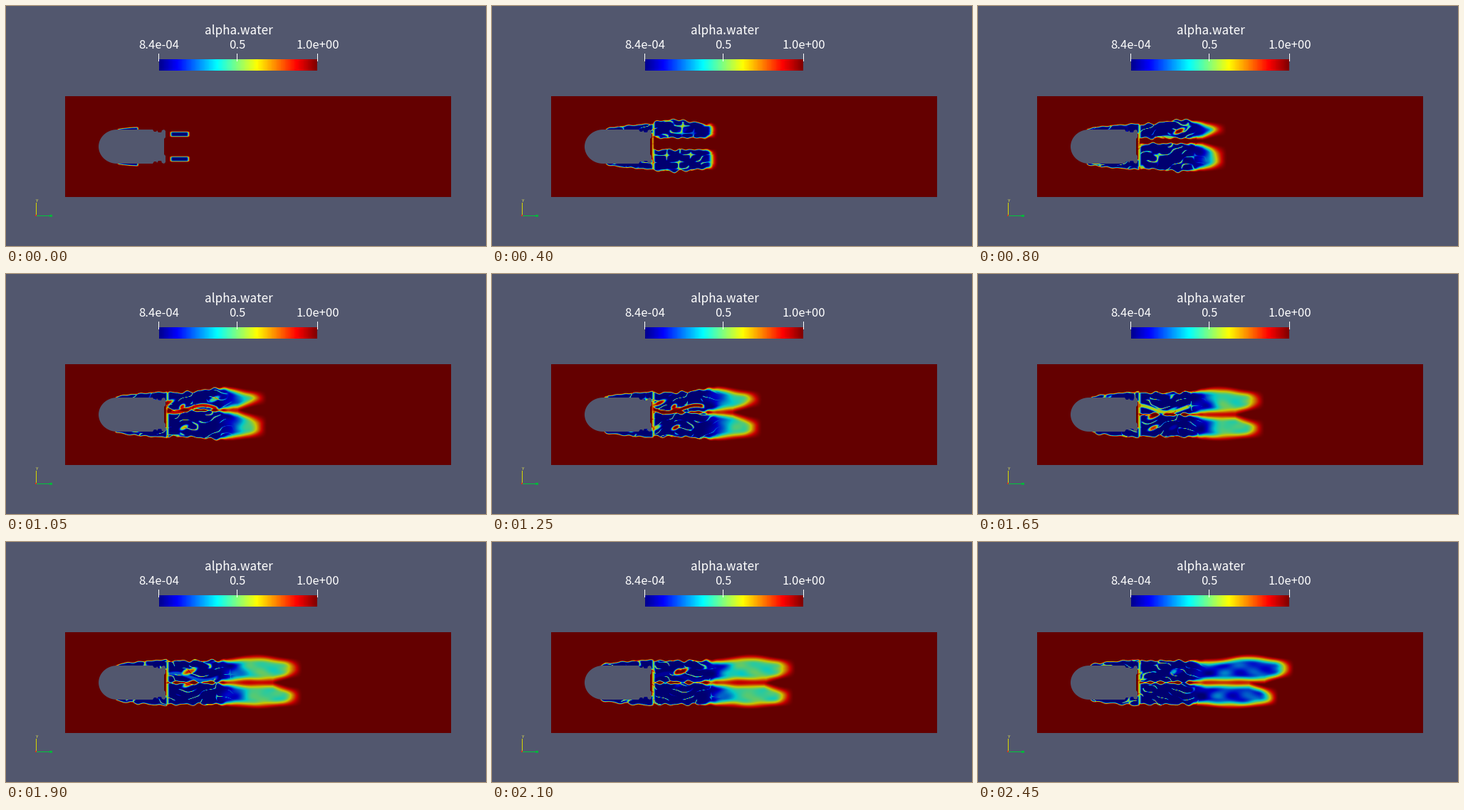
A matplotlib script that plays this animation: 674 by 338 pixels, repeating every 2500 ms.

```python
import numpy as np
import matplotlib.pyplot as plt
from matplotlib.animation import FuncAnimation
from matplotlib.colors import LinearSegmentedColormap
from matplotlib.patches import Polygon, Rectangle

W, H, DPI = 674, 338, 64
FRAMES, STEP = 50, 50
LAST = (FRAMES - 1) * STEP
PT = 72 / DPI
BG = "#52576e"
LEFT, RIGHT, TOP, BOTTOM = 83, 625, 127, 269
AXIS, BODY_R, STERN = 198, 24, 222
LIT = .79  # the tank surface is shaded darker than the legend

STOPS = [(0, (0, 0, .56)), (.111, (0, 0, 1)), (.365, (0, 1, 1)), (.492, (.5, 1, .5)),
         (.619, (1, 1, 0)), (.873, (1, 0, 0)), (1, (.5, 0, 0))]


def jet(shade):
    stops = [(p, tuple(shade * c for c in rgb)) for p, rgb in STOPS]
    return LinearSegmentedColormap.from_list("jet", stops, 256)


# Only this part of the tank ever holds vapour.
X0, X1 = 140, 460
X, Y = np.meshgrid(np.arange(X0, X1) + .5, np.arange(TOP, BOTTOM) + .5)
R = abs(Y - AXIS)


def smooth(v):
    v = np.clip(v, 0, 1)
    return v * v * (3 - 2 * v)


# The mesh is coarser downstream, so edges blur there.
COARSE = smooth((X - 290) / 35)
EDGE = 2.8 + 11.5 * COARSE

rng = np.random.default_rng(7)


def make_waves(count, long_x, long_y):
    kx = 2 * np.pi / rng.uniform(*long_x, count) * rng.choice([-1, 1], count)
    ky = 2 * np.pi / rng.uniform(*long_y, count)
    return list(zip(kx, ky, rng.uniform(0, 2 * np.pi, count), rng.uniform(-2, 2, count)))


FINE = make_waves(6, (22, 60), (13, 34))
BROAD = make_waves(5, (28, 60), (20, 50))
ROUGH = make_waves(5, (12, 32), (30, 90))
# Water pockets: birth time, x, y, length, height
POCKETS = rng.uniform((500, 230, 176, 4, 2), (2300, 285, 222, 9, 4), (9, 5))


def noise(waves, t, speed=.06):
    x = X - speed * t
    total = sum(np.sin(kx * x + ky * Y + p + w * t / 1000) for kx, ky, p, w in waves)
    return total * np.sqrt(2 / len(waves))


def lobe(t, side, rough):
    """One half of the wake; side is -1 above the axis and 1 below."""
    s, grow = t / LAST, smooth(t / 350)
    front = 259 + 182 * s ** .65 - (22 * smooth((t - 2000) / 450) if side > 0 else 0)
    middle = AXIS - 8 * np.sin(np.pi * min(t, 1600) / 1600) ** 2

    bulge = np.exp(-((X - front + 60) / 34) ** 2)
    outer = 32 + (7 if side < 0 else 4) * bulge
    outer = 22 + (outer - 22) * grow + 2.5 * COARSE
    split = -9 + 17 * smooth((X - front + 75) / 70)
    split = np.maximum(split, 7 * (1 - smooth((t - 500) / 500)))
    inner = 13 + (side * (middle - AXIS) + split - 13) * grow - 3 * COARSE

    across = side * (Y - AXIS)
    start = 229 - 4 * grow
    level = 1 - (.38 - .3 * smooth((t - 2100) / 350)) * smooth((X - 306 - 10 * s) / 32)
    return (smooth((outer - across + rough) / EDGE)
            * smooth((across - inner + rough) / EDGE)
            * smooth((X - start) / 5)
            * smooth((front + 4 * COARSE - X) / (2 * EDGE))
            * level)


def sheet(t, rough):
    """Thin vapour layer along both sides of the body."""
    grow = smooth(t / 350)
    start = 155 + 4 * np.sin(t / 190)
    end = 187 + 41 * grow
    u = np.clip((X - start) / (end - start), 0, 1)
    outer = BODY_R + .7 + (4 + 5 * grow) * np.sqrt(u)
    return smooth((outer - R + .5 * rough) / 3) * smooth((X - start) / 4) * smooth((end - X) / 4)


def meander(t):
    """Wavy water jet near the axis, strongest in mid loop."""
    strength = np.sin(np.pi * t / 2500) ** 4
    y = AXIS - 8 + 5 * np.sin((X - .05 * t) / 13)
    span = smooth((X - 224) / 4) * smooth((300 - X) / 6)
    return strength * span * np.exp(-((Y - y) / 2.8) ** 4)


def pocket(t, born, x, y, length, height):
    life = np.clip((t - born) / 400, -1, 1)
    dx, dy = X - x - 16 * life, Y - y
    dist = (dx / length) ** 2 + ((dy + .4 * dx) / height) ** 2
    return np.cos(life * np.pi / 2) * np.exp(-dist ** 2)


GAP = smooth((227 - X) / 3) * smooth((21 - R) / 4)


def water(t):
    rough = min(1, t / 300) * (1 - COARSE) * noise(ROUGH, t)
    broad = noise(BROAD, t)
    dry = (1 - lobe(t, -1, rough)) * (1 - lobe(t, 1, rough)) * (1 - sheet(t, rough))
    vapour = 1 - dry

    amount = .6 * min(1, t / 400)
    ridge = np.exp(-(noise(FINE, t) / .22) ** 2) * smooth(broad + .5)
    vapour *= 1 - amount * ridge * (1 - COARSE)
    vapour *= 1 - .1 * COARSE * (1 + broad / 2)
    vapour *= 1 - meander(t)
    for p in POCKETS:
        vapour *= 1 - pocket(t, *p)
    return 1 - vapour * (1 - GAP)


fig = plt.figure(figsize=(W / DPI, H / DPI), dpi=DPI, facecolor=BG)
ax = fig.add_axes([0, 0, 1, 1])
ax.axis("off")


def image(data, cmap, extent):
    return ax.imshow(data, cmap=cmap, vmin=0, vmax=1, aspect="auto",
                     interpolation="nearest", extent=extent)


def box(x, y, w, h, color):
    ax.add_patch(Rectangle((x, y), w, h, fc=color, ec="none", zorder=4))


def label(x, y, text, size=16.6, color="white"):
    ax.text(x, y, text, fontsize=size * PT, color=color, ha="center", va="baseline",
            family="Noto Sans CJK JP", weight="light", zorder=5)


field = np.ones((BOTTOM - TOP, RIGHT - LEFT))
tank = image(field, jet(LIT), (LEFT, RIGHT, BOTTOM, TOP))
image(np.linspace(0, 1, 222)[None], jet(1), (215, 437, 91, 75))
ax.set_xlim(0, W)
ax.set_ylim(H, 0)

# Body: round nose, straight sides, notched rear corners
angle = np.linspace(1.5 * np.pi, .5 * np.pi, 40)
nose = [(156 + 26 * np.cos(a), AXIS + BODY_R * np.sin(a)) for a in angle]
notch = [(206, 174), (208, 177), (211, 177), (212, 175), (214, 178),
         (218, 178), (219, 175), (STERN, 174), (224, 176), (224, 185), (STERN, 187)]
mirror = [(x, 2 * AXIS - y) for x, y in notch]
ax.add_patch(Polygon(nose + mirror + notch[::-1], fc=BG, ec="none", zorder=3))

label(327, 40, "alpha.water", 17)
for x, text in [(214, "8.4e-04"), (324, "0.5"), (437, "1.0e+00")]:
    label(x + 1, 60, text)
    box(x, 67, 1, 11, "white")

# Orientation axes
box(42, 277, 1, 18, "#d8d800")
box(42, 295, 21, 1, "#00c83c")
box(61, 294, 4, 3, "#00b43c")
box(41, 294, 2, 2, "#e03020")
label(43.5, 276.5, "Y", 6, "#e8e850")


def update(i):
    field[:, X0 - LEFT:X1 - LEFT] = water(i * STEP)
    tank.set_data(field)
    return [tank]


anim = FuncAnimation(fig, update, frames=FRAMES, interval=STEP,
                     repeat=True, repeat_delay=0, blit=False)
plt.show()
```
